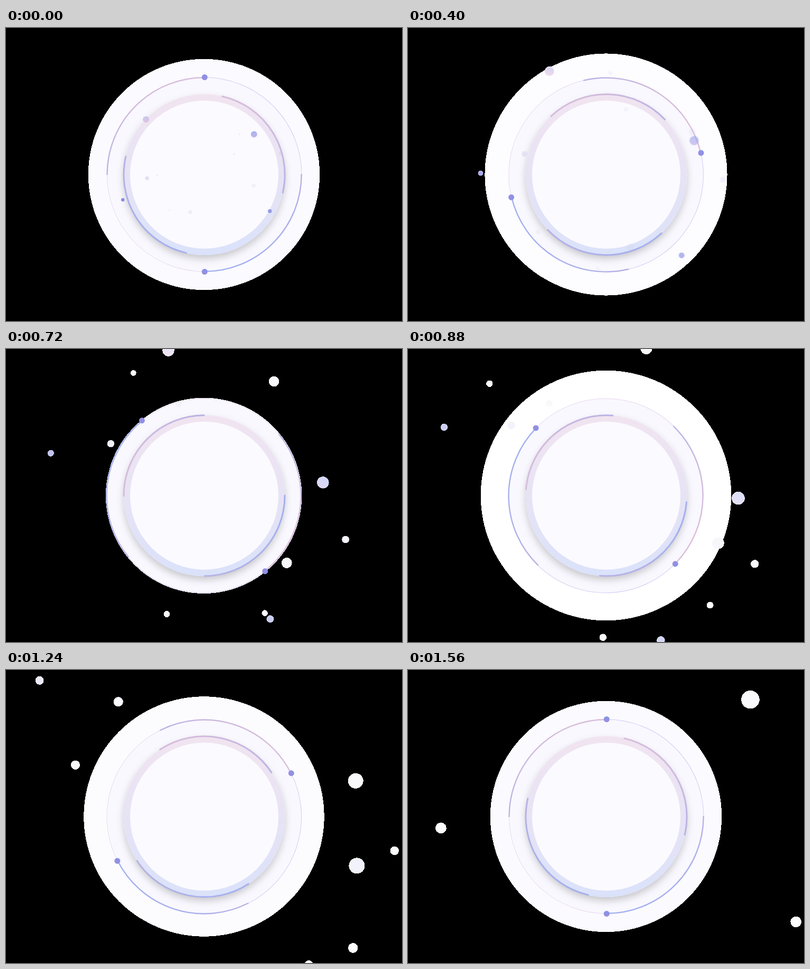
Write an HTML page that moves like this. It is 750 px wide and 556 px high and loops after 1.6 s.

```html
<!DOCTYPE html>
<html lang="en">
<head>
<meta charset="utf-8">
<title>Pulsing ring</title>
<style>
  html, body { margin: 0; height: 100%; overflow: hidden; background: #000; }
  svg { display: block; }
  .matte { fill: #fff; shape-rendering: crispEdges; }
  .arc { fill: none; stroke: url(#sweep); stroke-linecap: round; }
</style>
</head>
<body>
<svg width="750" height="556" viewBox="0 0 750 556">
  <defs>
    <linearGradient id="sweep" gradientUnits="userSpaceOnUse" x1="0" y1="-170" x2="0" y2="170">
      <stop stop-color="#d9bedb"/><stop offset=".5" stop-color="#b9b2e4"/><stop offset="1" stop-color="#a3b0ef"/>
    </linearGradient>
    <linearGradient id="thin" gradientUnits="userSpaceOnUse" x1="130" y1="-130" x2="-130" y2="130">
      <stop stop-color="#d2d2f5"/><stop offset="1" stop-color="#ecdff2"/>
    </linearGradient>
    <linearGradient id="band" x2="0" y2="1">
      <stop stop-color="#f1e4f0"/><stop offset=".5" stop-color="#e7e3f5"/><stop offset="1" stop-color="#dae2fa"/>
    </linearGradient>
    <linearGradient id="knob" x2="0" y2="1">
      <stop stop-color="#8593ea"/><stop offset="1" stop-color="#9c8ddd"/>
    </linearGradient>
    <linearGradient id="sky" x2="0" y2="1">
      <stop stop-color="#98a4f0"/><stop offset="1" stop-color="#b8a8e4"/>
    </linearGradient>
    <linearGradient id="rose" x2="0" y2="1">
      <stop stop-color="#aeaee6"/><stop offset="1" stop-color="#dab4d4"/>
    </linearGradient>
    <filter id="shadow" x="-20%" y="-20%" width="140%" height="140%">
      <feDropShadow dx="0" dy="7" stdDeviation="7" flood-color="#000" flood-opacity=".2"/>
    </filter>
  </defs>
  <g transform="translate(375 278)">
    <g id="mattes" class="matte"></g>
    <g id="halo">
      <circle class="matte"/>
      <circle fill="#fbfaff"/>
    </g>
    <g id="plate">
      <circle class="matte" cx=".5" r="185.7"/>
      <circle cx=".5" r="184.5" fill="#f9f8fe"/>
    </g>
    <g transform="translate(.5 .3)">
      <circle r="152.7" fill="url(#band)" filter="url(#shadow)"/>
      <circle r="140.5" fill="#fbfaff"/>
      <g id="inner" class="arc" stroke-width="3">
        <path d="M0-152.5A152.5 152.5 0 0 1 152.5 0M0 152.5A152.5 152.5 0 0 1-152.5 0"/>
      </g>
    </g>
    <g id="outer">
      <circle cx=".6" r="184.3" fill="none" stroke="url(#thin)" stroke-width="1.2"/>
      <path class="arc" stroke-width="2.4" d="M-183.4 0A184 184 0 0 1 .6-184M184.6 0A184 184 0 0 1 .6 184"/>
      <circle cx="1.2" cy="-184.5" r="5.5" fill="url(#knob)"/>
      <circle cx="1.2" cy="184.5" r="5.5" fill="url(#knob)"/>
    </g>
    <g id="tints"></g>
  </g>
</svg>
<script>
const STEP = 40, STEPS = 40;
const $ = id => document.getElementById(id);

function add(parent, tag, attrs = {}) {
  const el = document.createElementNS("http://www.w3.org/2000/svg", tag);
  for (const key in attrs) el.setAttribute(key, attrs[key]);
  return parent.appendChild(el);
}

// Each dot: distance, angle, radius, opacity, fill
const swarms = [
  { spin: 1.86, grow: .0492, life: 37, limit: 70, dots: [
    [121.2, -39, 6, .85, "url(#sky)"],
    [152, -136.6, 6, .65, "url(#rose)"],
    [161.6, 162.7, 3.2, 1, "#8789e4"],
    [142.3, 29.2, 3.7, .9, "#8b93e2"],
    [108.5, 176.3, 3.6, .5, "#c8c4ee"],
    [150.2, -15.4, 3.7, .3, "#c8c4ee"]] },
  { spin: -4.045, grow: .0935, life: 60, limit: 149.6, dots: [
    [76.3, 110.5, 3.75, .24, "#c9c9e0"],
    [95.8, 12.6, 3.7, .2, "#c9c9e0"],
    [89.2, 178.7, 2.25, .2, "#c9c9e0"],
    [101.5, -48.8, 2.05, .16, "#c9c9e0"],
    [94.8, 134, 2.15, .12, "#c9c9e0"],
    [68.1, -34.4, 2.25, .16, "#c9c9e0"]] }
];

for (const swarm of swarms) {
  swarm.matte = add($("mattes"), "g");
  swarm.tint = add($("tints"), "g");
  for (const [dist, angle, r, opacity, fill] of swarm.dots) {
    const a = angle * Math.PI / 180;
    const place = { cx: dist * Math.cos(a), cy: dist * Math.sin(a), r };
    add(swarm.matte, "circle", place);
    add(swarm.tint, "circle", { ...place, opacity, fill });
  }
}

const [haloMatte, haloTint] = $("halo").children;

function draw(n) {
  const s = Math.max(0, n - .4);
  const turn = Math.min(8 * s, 7.9 * (STEPS - 1 - n));
  $("plate").setAttribute("transform", `rotate(${turn})`);
  $("outer").setAttribute("transform", `rotate(${turn})`);
  $("inner").setAttribute("transform", `rotate(${13 - .733 * turn})`);

  // The halo drops out while the swing is near its peak
  $("halo").setAttribute("visibility", turn > 137 ? "hidden" : "visible");
  haloMatte.setAttribute("r", 219.2 + .135 * turn);
  haloTint.setAttribute("r", 218.7 + .135 * turn);
  haloTint.setAttribute("opacity", 1 - turn / 160);

  for (const { spin, grow, life, limit, matte, tint } of swarms) {
    const angle = Math.sign(spin) * Math.min(Math.abs(spin) * s, limit);
    const alpha = Math.max(0, 1 - s / life);
    for (const group of [matte, tint]) {
      group.setAttribute("transform", `translate(.5 0) rotate(${angle}) scale(${1 + grow * s})`);
      group.setAttribute("visibility", alpha > 0 ? "visible" : "hidden");
    }
    tint.setAttribute("opacity", alpha);
  }
}

function tick() {
  draw(Math.floor(performance.now() / STEP) % STEPS);
  requestAnimationFrame(tick);
}
tick();
</script>
</body>
</html>
```
